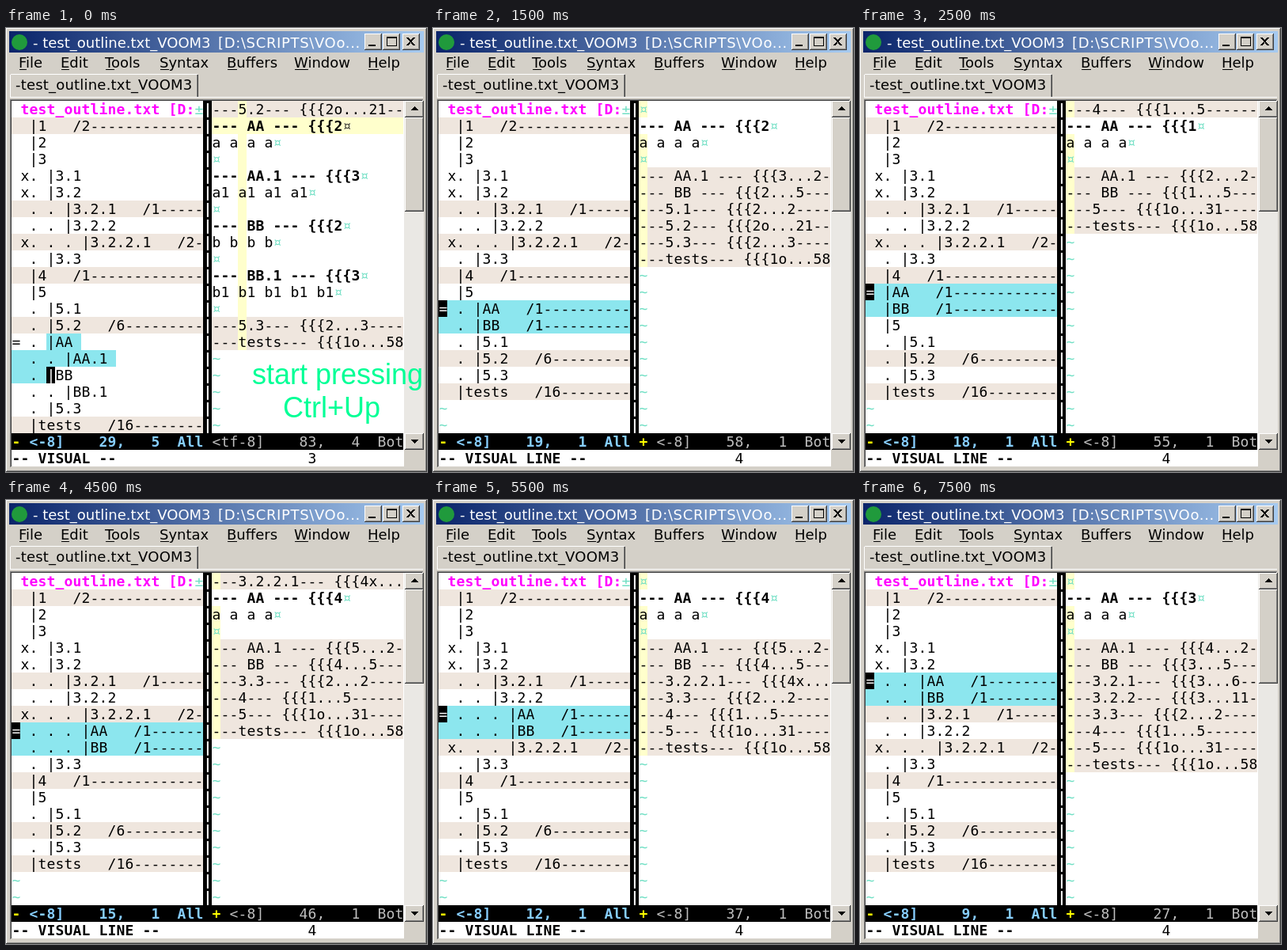
Write an HTML page that moves like this. It is 532x561 px and loops after 8000 ms.

```html
<!DOCTYPE html>
<html lang="en">
<head>
<meta charset="utf-8">
<title>Outline editor</title>
<style>
html, body { margin: 0; width: 100%; height: 100%; overflow: hidden; background: #d4d0c8; }
svg { display: block; }
text { white-space: pre; }
.ui { font: 18px "DejaVu Sans", sans-serif; }
.mono { font: 18px "DejaVu Sans Mono", monospace; }
.b { font-weight: bold; }
.note { font: 36px "Liberation Sans", Arial, sans-serif; fill: #00ff96; }
</style>
</head>
<body>
<svg width="532" height="561" viewBox="0 0 532 561" shape-rendering="crispEdges">
  <defs>
    <linearGradient id="bar">
      <stop offset="0" stop-color="#0a246a"/>
      <stop offset="1" stop-color="#a6caf0"/>
    </linearGradient>
  </defs>
  <g id="frame"></g>
  <g id="screen" class="mono"></g>
  <g id="note" class="note">
    <text x="311" y="450">start pressing</text>
    <text x="350" y="492">Ctrl+Up</text>
  </g>
</svg>
<script>
const CW = 11, RH = 21, TOP = 92, LEFT = 7, RIGHT = 260, COLS = 22, ROWS = 20;
const FOLD = '#efe6de', SELECT = '#8ce6ee', CURSOR = '#ffffcc', MARK = '#70dfc4', FACE = '#d4d0c8';
const el = id => document.getElementById(id);

const rect = (x, y, w, h, fill) => `<rect x="${x}" y="${y}" width="${w}" height="${h}" fill="${fill}"/>`;
const esc = s => s.replace(/&/g, '&amp;').replace(/</g, '&lt;').replace(/ /g, '\u00a0');
const ui = (s, x, y, fill = '#000', gap = 0) =>
  `<text class="ui" x="${x}" y="${y}" fill="${fill}" letter-spacing="${gap}">${esc(s)}</text>`;

// Text and backgrounds on the character grid of a pane.
function put(s, x0, col, row, fill = '#000', bold = false) {
  const xs = [...s].map((_, i) => x0 + (col + i) * CW + 0.5).join(' ');
  return `<text x="${xs}" y="${TOP + row * RH + 17}" fill="${fill}"${bold ? ' class="b"' : ''}>${esc(s)}</text>`;
}
const fillCells = (x0, col, row, n, fill) => rect(x0 + col * CW, TOP + row * RH, n * CW, RH, fill);

function raised(x, y, w, h) {
  return rect(x, y, w, h, '#404040') + rect(x, y, w - 1, h - 1, '#fff') +
    rect(x + 1, y + 1, w - 2, h - 2, '#808080') + rect(x + 1, y + 1, w - 3, h - 3, FACE);
}

function drawFrame() {
  let s = raised(0, 0, 532, 561) + rect(4, 4, 524, 27, 'url(#bar)');
  s += '<circle cx="17" cy="18" r="10" fill="#209a3c" shape-rendering="auto"/>';
  s += ui('- test_outline.txt_VOOM3', 34, 25, '#fff') + ui('[D:\\SCRIPTS\\VOo...', 268, 25, '#fff', 0.65);
  s += raised(453, 7, 22, 21) + raised(476, 7, 22, 21) + raised(501, 7, 22, 21);
  s += rect(458, 21, 9, 2, '#000');
  s += '<path d="M481 11.5h12v11h-12zM481 12.5h12" fill="none" stroke="#000"/>';
  s += '<path d="M507 12l9 10M516 12l-9 10" stroke="#000" stroke-width="2"/>';

  const menu = { File: [16, 9], Edit: [69, 10], Tools: [125, 11], Syntax: [194, 11],
    Buffers: [279, 12], Window: [364, 17], Help: [457, 13] };
  for (const [name, [x, w]] of Object.entries(menu)) s += ui(name, x, 50) + rect(x + 1, 52, w, 1, '#000');

  s += rect(5, 87, 522, 1, '#fff');
  s += rect(5, 59, 1, 28, '#fff') + rect(6, 58, 236, 1, '#fff');
  s += rect(242, 59, 1, 28, '#404040') + rect(241, 59, 1, 28, '#808080');
  s += ui('-test_outline.txt_VOOM3', 12, 78, '#000', 0.2);

  s += rect(5, 90, 522, 1, '#808080') + rect(5, 90, 1, 465, '#808080');
  s += rect(6, 91, 520, 1, '#404040') + rect(6, 91, 1, 463, '#404040');
  s += rect(7, 92, 496, 462, '#fff');
  s += rect(503, 92, 25, 441, '#eae8e4');
  s += raised(504, 92, 24, 21) + raised(504, 113, 24, 119) + raised(504, 512, 24, 21);
  s += '<path d="M511 104h10l-5-5zM511 520h10l-5 5z" fill="#000"/>';
  return s;
}

// Tree rows as [label, level, hidden children, mark].
const TREE = [['1', 1, 2], ['2', 1], ['3', 1], ['3.1', 2, 0, 'x'], ['3.2', 2, 0, 'x'], ['3.2.1', 3, 1],
  ['3.2.2', 3], ['3.2.2.1', 4, 2, 'x'], ['3.3', 2], ['4', 1, 1], ['5', 1], ['5.1', 2], ['5.2', 2, 6],
  ['5.3', 2], ['tests', 1, 16]];
const FOLDS = { '3.2.1': '3...6', '3.2.2': '3...11', '3.2.2.1': '4x...8', '3.3': '2...2', '4': '1...5',
  '5': '1o...31', '5.1': '2...2', '5.2': '2o...21', '5.3': '2...3', 'tests': '1o...58' };
const foldLine = name => `---${name}--- {{{${FOLDS[name]}`;

// Each step: rows above the moved pair, its level, tree line, body line, fold above, folds below.
const TAIL = ['3.3', '4', '5', 'tests'];
const STEPS = [
  null,
  [12, 2, 20, 61, '5.1', ['5.2', '5.3', 'tests']],
  [11, 2, 19, 58, '', ['5.1', '5.2', '5.3', 'tests']],
  [10, 1, 18, 55, '4', ['5', 'tests']],
  [9, 2, 16, 49, '3.3', TAIL.slice(1)],
  [8, 4, 15, 46, '3.2.2.1', TAIL],
  [7, 4, 12, 37, '', ['3.2.2.1', ...TAIL]],
  [6, 3, 11, 34, '3.2.1', ['3.2.2', ...TAIL]],
  [5, 3, 9, 27, '', ['3.2.1', '3.2.2', ...TAIL]]
];

function treeLine([name, level, kids, mark = ' ']) {
  const s = (mark === '=' ? '= ' : ' ' + mark) + '. '.repeat(level - 1) + '|' + name;
  return kids ? (s + '   /' + kids).padEnd(COLS, '-') : s;
}

function drawTree(nodes, first, whole) {
  let s = put('test_outline.txt [D:', LEFT, 1, 0, '#ff00ff', true) + put('±', LEFT, 21, 0, MARK);
  nodes.forEach((node, i) => {
    const row = i + 1;
    const picked = whole && (row === first || row === first + 1);
    if (picked || node[2]) s += fillCells(LEFT, 0, row, COLS, picked ? SELECT : FOLD);
    if (!whole) {
      if (row === 14) s += fillCells(LEFT, 4, row, 4, SELECT);
      if (row === 15) s += fillCells(LEFT, 0, row, 12, SELECT);
      if (row === 16) s += fillCells(LEFT, 0, row, 4, SELECT);
    }
    s += put(treeLine(node), LEFT, 0, row);
  });
  for (let row = nodes.length + 1; row < ROWS; row++) s += put('~', LEFT, 0, row, MARK);
  const [col, row, ch] = whole ? [0, first, '='] : [4, 16, '|'];
  return s + fillCells(LEFT, col, row, 1, '#000') + put(ch, LEFT, col, row, '#fff');
}

// Body lines as [kind, text]: folded, heading or plain.
function drawBody(lines, col, lit) {
  let s = '';
  lines.forEach(([kind, text], row) => {
    const current = row === 1;
    if (kind === 'fold') s += fillCells(RIGHT, 0, row, COLS, FOLD);
    if (current && lit) s += fillCells(RIGHT, 0, row, COLS, CURSOR);
    if (!current) s += fillCells(RIGHT, col, row, 1, CURSOR);
    if (kind === 'fold') s += put(text.padEnd(COLS, '-').slice(0, COLS), RIGHT, 0, row);
    else s += put(text, RIGHT, 0, row, '#000', kind === 'head') +
      put('¤', RIGHT, text.length, row, current && lit ? '#333' : MARK);
  });
  for (let row = lines.length; row < ROWS; row++) s += put('~', RIGHT, 0, row, MARK);
  return s;
}

const position = (line, col, end) => `${String(line).padStart(6)},   ${col}  ${end}`;

function drawStatus(tree, body, col, bodyCol, whole) {
  let s = rect(LEFT, TOP + ROWS * RH, 495, RH, '#000') + rect(249, TOP, 11, ROWS * RH, '#000');
  for (let row = 0; row < ROWS; row++) s += put('|', 249, 0, row, '#fff', true);
  s += put('-', LEFT, 0, ROWS, '#ffff00', true);
  s += put('<-8]' + position(tree, col, 'All'), LEFT, 2, ROWS, '#87ceff', true);
  if (whole) s += put('+', RIGHT, 0, ROWS, '#ffff00', true);
  const name = whole ? '  <-8]' : '<tf-8]';
  s += put(name + position(body, bodyCol, 'Bot'), RIGHT, 0, ROWS, '#bebebe');
  s += put(whole ? '-- VISUAL LINE --' : '-- VISUAL --', LEFT, 0, ROWS + 1, '#000', true);
  return s + put(whole ? '4' : '3', LEFT, 34, ROWS + 1);
}

function section(name, level, text) {
  return [['head', `--- ${name} --- {{{${level}`], ['plain', text], ['plain', '']];
}

function drawStart() {
  const nodes = TREE.slice();
  nodes.splice(13, 0, ['AA', 2, 0, '='], ['AA.1', 3], ['BB', 2], ['BB.1', 3]);
  const lines = [['fold', foldLine('5.2')], ...section('AA', 2, 'a a a a'),
    ...section('AA.1', 3, 'a1 a1 a1 a1'), ...section('BB', 2, 'b b b b'),
    ...section('BB.1', 3, 'b1 b1 b1 b1 b1'), ['fold', foldLine('5.3')], ['fold', foldLine('tests')]];
  return drawTree(nodes, 14, false) + drawBody(lines, 3, true) + drawStatus(29, 83, 5, 4, false);
}

function drawStep([above, level, tree, body, prev, below]) {
  const nodes = TREE.slice();
  nodes.splice(above, 0, ['AA', level, 1, '='], ['BB', level, 1]);
  const lines = [prev ? ['fold', foldLine(prev)] : ['plain', ''], ...section('AA', level, 'a a a a'),
    ['fold', `--- AA.1 --- {{{${level + 1}...2`], ['fold', `--- BB --- {{{${level}...5`],
    ...below.map(name => ['fold', foldLine(name)])];
  return drawTree(nodes, above + 1, true) + drawBody(lines, 0, false) + drawStatus(tree, body, 1, 1, true);
}

let shown = -1;
function update(ms) {
  const step = Math.floor((ms % 8000 + 500) / 1000);
  if (step !== shown) {
    shown = step;
    el('screen').innerHTML = step ? drawStep(STEPS[step]) : drawStart();
    el('note').style.display = step ? 'none' : '';
  }
}

el('frame').innerHTML = drawFrame();
const start = performance.now();
function tick() {
  update(performance.now() - start);
  requestAnimationFrame(tick);
}
tick();
</script>
</body>
</html>
```
